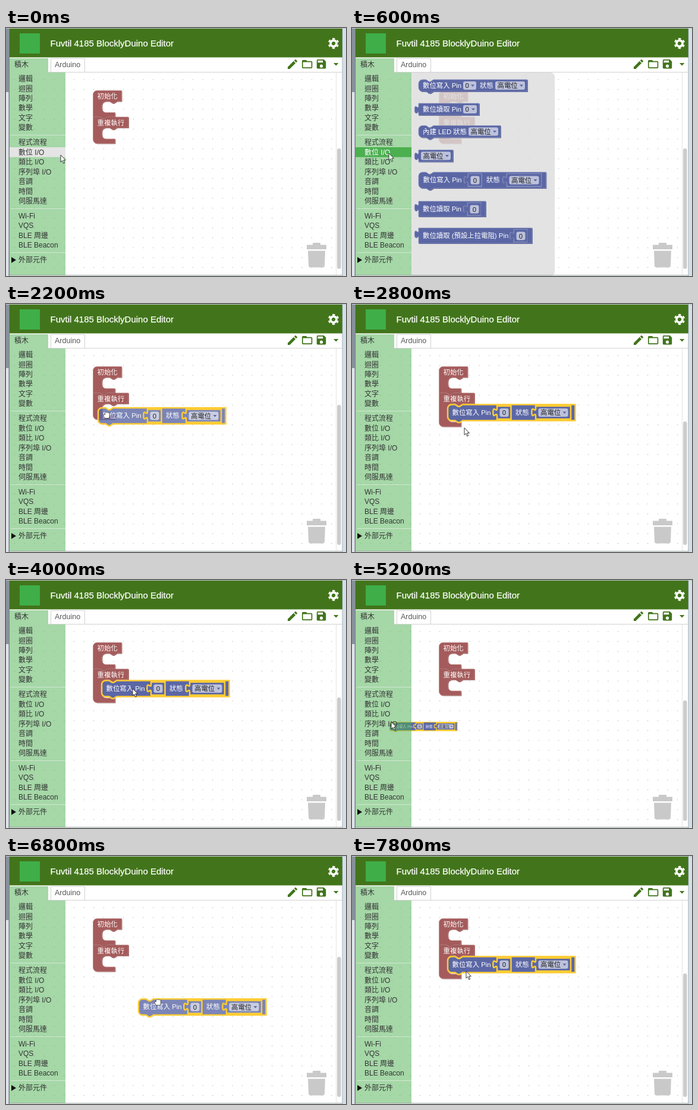
Recreate the animation shown at these times as an HTML page. Size 572 px wide and 418 px high, loop 8 s.

```html
<!DOCTYPE html>
<html lang="zh-Hant">
<head>
<meta charset="utf-8">
<title>Block editor</title>
<style>
html, body { margin: 0; width: 100%; height: 100%; overflow: hidden; background: #fff; }
svg { display: block; }
text { font: 12px "Liberation Sans", "Noto Sans CJK TC", "Noto Sans CJK", sans-serif; fill: #333; white-space: pre; }
.title { font-size: 15px; fill: #fff; stroke: #fff; stroke-width: .25; }
.block text { font-size: 11.4px; fill: #fff; }
.block .value { fill: #222; }
.field { fill: #fff; fill-opacity: .6; }
.blue { --base: #5b67a5; --dark: #495284; --light: #8c95c0; }
.red { --base: #a55b5b; --dark: #844949; --light: #c08c8c; }
.shadow { fill: var(--dark); }
.fill, .arrow { fill: var(--base); }
.edge { fill: none; stroke: var(--light); stroke-width: .8; }
.selected > .edge { stroke: #fc3; stroke-width: 2.5; }
.selected > .shadow, .selected g > .edge { display: none; }
.dragging .fill { fill-opacity: .8; }
.dragging .shadow { display: none; }
.icon { fill: #41741c; fill-rule: evenodd; }
</style>
</head>
<body>
<svg id="stage" width="572" height="418" viewBox="0 0 572 418"></svg>
<script>
const LOOP = 8000, STEP = 200;

// Each waypoint: time, x, y of the pointer.
const WAYPOINTS = [
  [0, 92, 214], [400, 78, 212], [600, 62, 211], [1000, 88, 232], [1400, 136, 262],
  [1600, 140, 265], [1800, 129, 254], [2200, 170, 187], [2600, 175, 182],
  [3200, 217, 262], [3400, 218, 264], [4000, 213, 183], [4200, 196, 189],
  [4800, 66, 239], [5200, 66, 239], [5600, 56, 212], [5800, 54, 211],
  [6200, 143, 249], [6400, 168, 248], [6800, 256, 246], [7000, 243, 225],
  [7400, 180, 167], [7600, 178, 171], [7800, 192, 194], [8000, 192, 194]
];
// Each drag: start, end, grip offset inside the block.
const DRAGS = [[1800, 2600, 15, 12], [4200, 5200, 53, 12], [6400, 7600, 33, 5]];
const FLYOUT = [[600, 1800], [5800, 6400]];
const PLACED = [[2600, 4200], [7600, 8000]];
const SHRINK = [5200, 5400];
const SLOT = { x: 161, y: 169.5 };
const PIECE = { w: 214.5, h: 27 };

const ROWS = [
  ['邏輯', 86], ['迴圈', 102.3], ['陣列', 118.8], ['數學', 135], ['文字', 152], ['變數', 168],
  ['程式流程', 193], ['數位 I/O', 209.3], ['類比 I/O', 226], ['序列埠 I/O', 242.3],
  ['音調', 259], ['時間', 275.3], ['伺服馬達', 292],
  ['Wi-Fi', 316.5], ['VQS', 333], ['BLE 周邊', 349.5], ['BLE Beacon', 366], ['外部元件', 391]
];
const ACTIVE_ROW = 7;

const label = (x, mid, s, attrs = '') => `<text x="${x}" y="${mid + 4.2}" ${attrs}>${s}</text>`;
const rect = (x, y, w, h, fill, more = '') =>
  `<rect x="${x}" y="${y}" width="${w}" height="${h}" fill="${fill}" ${more}/>`;
const body = d => `<path class="shadow" d="${d}" fill-rule="evenodd" transform="translate(.9 .9)"/>
  <path class="fill" d="${d}" fill-rule="evenodd"/>`;
const edge = d => `<path class="edge" d="${d}"/>`;
const shape = d => body(d) + edge(d);
const group = (x, y, content, attrs = '') => `<g transform="translate(${x} ${y})" ${attrs}>${content}</g>`;

const NOTCH_RIGHT = 'l5 3.3 2.5 0 5-3.3', NOTCH_LEFT = 'l-5 3.3 -2.5 0 -5-3.3';
const stackPath = (w, h) =>
  `M0 6.5A6.5 6.5 0 0 1 6.5 0H12.5${NOTCH_RIGHT}H${w}V${h}H25${NOTCH_LEFT}H6.5A6.5 6.5 0 0 1 0 ${h - 6.5}z`;
const outputPath = (w, h) => `M0 0H${w}V${h}H0V16.7c0-8.3-6.7 6.7-6.7-6.2s6.7 2 6.7-6.2z`;
const holePath = (x, y, w, h) =>
  `M${x} ${y}v4.2c0 8.3-6.7-6.7-6.7 6.2s6.7-2 6.7 6.2V${y + h}h${w}v${-h}z`;
const loopPath = (w, slot, first) => {
  const top = first ? 'M0 6.5A6.5 6.5 0 0 1 6.5 0' : `M0 0H12.5${NOTCH_RIGHT}`;
  const end = 18 + slot + 7.5;
  const bottom = first ? `H25${NOTCH_LEFT}H0z` : `H6.5A6.5 6.5 0 0 1 0 ${end - 6.5}z`;
  return `${top}H${w}V18H40${NOTCH_LEFT}h-5.8a6.7 6.7 0 0 0-6.7 6.7V${18 + slot - 6.7}` +
    `a6.7 6.7 0 0 0 6.7 6.7H37V${end}${bottom}`;
};

const field = (x, mid, w) => `<rect class="field" x="${x}" y="${mid - 7}" width="${w}" height="14" rx="3"/>`;
const numberField = (x, mid) =>
  field(x, mid, 15) + label(x + 7.5, mid, '0', 'class="value" text-anchor="middle"');
const dropdown = (x, mid, w, s) =>
  field(x, mid, w) + label(x + 3.5, mid, s, 'class="value"') +
  `<path class="arrow" d="M${x + w - 9} ${mid - 1.5}h6l-3 3.6z"/>`;
const socketNumber = x => group(x, 2.5, shape(outputPath(22.5, 21)) + numberField(4, 11));

const writePiece = () => {
  const d = stackPath(PIECE.w, PIECE.h) + holePath(83, 2.5, 23.5, 22) + holePath(148, 2.5, 59, 22);
  return body(d) + label(7.5, 13, '數位寫入 Pin') + socketNumber(83.5) + label(114, 13, '狀態') +
    group(148.5, 2.5, shape(outputPath(58, 21)) + dropdown(4, 11, 50, '高電位')) + edge(d);
};

const readPiece = (w, s) => shape(outputPath(w, 26) + holePath(w - 31, 2.5, 23.5, 22)) +
  label(7, 13, s) + socketNumber(w - 30.5);

const flyout = () => `<path d="M100 75H334a7 7 0 0 1 7 7V411a7 7 0 0 1-7 7H100z" fill="#ddd" fill-opacity=".82"/>
  <g class="block blue">` +
  group(112, 87, shape(stackPath(183, 20)) + label(7, 10, '數位寫入 Pin') + dropdown(75, 10, 22, '0') +
    label(103, 10, '狀態') + dropdown(129, 10, 50, '高電位')) +
  group(112, 127, shape(outputPath(102, 20)) + label(7, 10, '數位讀取 Pin') + dropdown(75, 10, 23, '0')) +
  group(112, 164.5, shape(stackPath(138, 20)) + label(7, 10, '內建 LED 狀態') + dropdown(84, 10, 50, '高電位')) +
  group(112, 205.5, shape(outputPath(58, 20)) + dropdown(4, 10, 50, '高電位')) +
  group(112, 243, writePiece(), 'id="pick"') +
  group(112, 292, readPiece(113, '數位讀取 Pin')) +
  group(112, 337, readPiece(191, '數位讀取 (預設上拉電阻) Pin')) + '</g>';

const header = rect(6, 1, 560, 48.5, '#42751b') +
  rect(23, 9, 34, 34, '#3fae49') +
  label(74.5, 26.3, 'Fuvtil 4185 BlocklyDuino Editor', 'class="title"') +
  `<g fill="none" stroke="#fff" transform="rotate(30 551 26)"><circle cx="551" cy="26" r="5" stroke-width="3.8"/>
    <circle cx="551" cy="26" r="8" stroke-width="2.4" stroke-dasharray="4.2 4.178" stroke-dashoffset="2.1"/></g>`;

const tabs = rect(6, 49.5, 560, 25.5, '#fff') + rect(6, 51, 65, 24, 'rgba(76,175,80,.5)') +
  label(14, 62, '積木') +
  '<path d="M75.5 75V51.5H132.5V75M6 74.5H566" fill="none" stroke="#d2d2d2"/>' +
  rect(6, 74, 65, 1, '#a5d7a7') +
  label(82, 62, 'Arduino', 'style="font-size:12.5px;fill:#555"') +
  `<g class="icon">
    <path transform="translate(471.3 50.3) scale(.89)" d="M3 17.25V21h3.75L17.81 9.94l-3.75-3.75zM20.71 7.04a1 1 0 0 0 0-1.41l-2.34-2.34a1 1 0 0 0-1.41 0l-1.83 1.83 3.75 3.75z"/>
    <path transform="translate(496.2 50.5) scale(.87)" d="M20 6h-8l-2-2H4a2 2 0 0 0-2 2v12a2 2 0 0 0 2 2h16a2 2 0 0 0 2-2V8a2 2 0 0 0-2-2zm0 12H4V8h16z"/>
    <path transform="translate(520.2 50.4) scale(.86)" d="M17 3H5a2 2 0 0 0-2 2v14a2 2 0 0 0 2 2h14a2 2 0 0 0 2-2V7zM12 19a3 3 0 1 1 0-6 3 3 0 0 1 0 6zM15 9H5V5h10z"/>
    <path d="M551 59h8.4l-4.2 4.4z"/></g>`;

const toolbox = rect(6, 75, 94, 342, 'rgba(76,175,80,.5)') +
  '<path d="M8 180.5H100M8 304.5H100M8 378.5H100" stroke="#d3e9d3"/>' +
  rect(6, 0, 94, 16.6, '#e4e4e4', 'id="band"') +
  ROWS.map(([s, mid], i) => label(21, mid, s, `id="row${i}"`)).join('') +
  '<path d="M9 386l8 5-8 5z" fill="#111"/>';

const trash = `<g fill="#c9c9c9"><path d="M506 365.5h10v-2.5q0-1 1-1h11q1 0 1 1v2.5h10v7.5H506z"/>
  <path d="M508 375.5h29l-1 25q-.2 3-3 3h-21q-2.8 0-3-3z"/></g>`;

const frame = rect(0, 0, 6, 418, '#dfe4e8') + rect(0, 0, 4.6, 108, '#87919a') + rect(4.6, 0, 1.2, 418, '#5c6670') +
  rect(565.6, 0, 1, 418, '#8b949c') + rect(566.6, 0, 5.4, 418, '#d2e0ec') +
  rect(0, 0, 572, 1, '#c5cbcf') + rect(6, 416.3, 560, 1, '#8f9a94');

document.getElementById('stage').innerHTML = `
  <defs><pattern id="dots" x="147" y="103" width="16.667" height="16.667" patternUnits="userSpaceOnUse">
    <rect width="1.2" height="1.2" fill="#b4b4b4"/></pattern></defs>
  ${rect(0, 0, 572, 418, '#fff')}${rect(6, 75, 549, 341, 'url(#dots)')}
  ${rect(555, 75, 1, 341, '#e3e3e3')}${rect(557, 203, 6.5, 203, '#ccc', 'id="thumb" rx="3"')}
  ${trash}
  <g class="block red">
    ${group(146.5, 150, shape(loopPath(59.5, 19, false)), 'id="empty"')}
    ${group(146.5, 150, shape(loopPath(59.5, 31, false)), 'id="filled"')}
    ${group(146.5, 105.5, shape(loopPath(48, 19, true)))}
    ${label(153.5, 114.3, '初始化')}${label(153.5, 159.3, '重複執行')}
  </g>
  <g id="piece" class="block blue selected">${writePiece()}</g>
  <g id="flyout">${flyout()}</g>
  ${toolbox}${tabs}${header}${frame}
  <path id="pointer" d="M0 0V12l2.7-2.5 2 4.7 2-.9-2-4.5H8.4z" fill="#fff" stroke="#222" stroke-width=".9"/>
  <path id="hand" d="M-3.5 5.5C-6 2-6.5 0-5-1l1.5.7V-3.7q1-1.5 2 0q1-1.6 2.1 0q1.1-1.2 2 .4q1.4-.7 1.8 1V2L3.4 5.5z" fill="#fff" stroke="#333" stroke-width=".8"/>`;

const el = id => document.getElementById(id);
const show = (id, on) => { el(id).style.display = on ? '' : 'none'; };
const within = (t, [a, b]) => t >= a && t < b;
const move = (id, x, y, scale = 1) => el(id).setAttribute('transform', `translate(${x} ${y}) scale(${scale})`);

function pointerAt(t) {
  const i = WAYPOINTS.findIndex(p => p[0] > t);
  const [t0, x0, y0] = WAYPOINTS[i - 1], [t1, x1, y1] = WAYPOINTS[i];
  const k = (t - t0) / (t1 - t0);
  return [x0 + (x1 - x0) * k, y0 + (y1 - y0) * k];
}

function draw(t) {
  const [x, y] = pointerAt(t);
  const drag = DRAGS.find(d => within(t, d));
  const open = FLYOUT.some(w => within(t, w));
  const placed = PLACED.some(w => within(t, w));
  const shrinking = within(t, SHRINK);

  show('pointer', !drag);
  show('hand', drag);
  move('pointer', x, y);
  move('hand', x, y);

  show('flyout', open);
  el('pick').classList.toggle('selected', x > 112 && y > 243 && y < 270);
  show('filled', placed);
  show('empty', !placed);

  show('piece', drag || placed || shrinking);
  el('piece').classList.toggle('dragging', !!drag);
  if (drag) move('piece', x - drag[2], y - drag[3]);
  else if (placed) move('piece', SLOT.x, SLOT.y);
  else if (shrinking) {
    const gone = .47, [, , gripX, gripY] = DRAGS[1];
    move('piece', x - gripX + PIECE.w / 2 * gone, y - gripY + PIECE.h * gone, 1 - gone);
  }

  const top = drag ? 170 : placed ? 198 : 203;
  el('thumb').setAttribute('y', top);
  el('thumb').setAttribute('height', 406 - top);

  const hovered = x < 100 && !drag && !shrinking
    ? ROWS.findIndex(r => Math.abs(r[1] - y) <= 8.3) : -1;
  const marked = open ? ACTIVE_ROW : hovered;
  show('band', marked >= 0);
  if (marked >= 0) el('band').setAttribute('y', ROWS[marked][1] - 8.3);
  el('band').setAttribute('fill', open ? '#4caf50' : '#e4e4e4');
  el('row' + ACTIVE_ROW).style.fill = open ? '#fff' : '';
}

const start = performance.now();
function tick() {
  const t = (performance.now() - start) % LOOP;
  draw(Math.floor(t / STEP) * STEP);
  requestAnimationFrame(tick);
}
tick();
</script>
</body>
</html>
```
